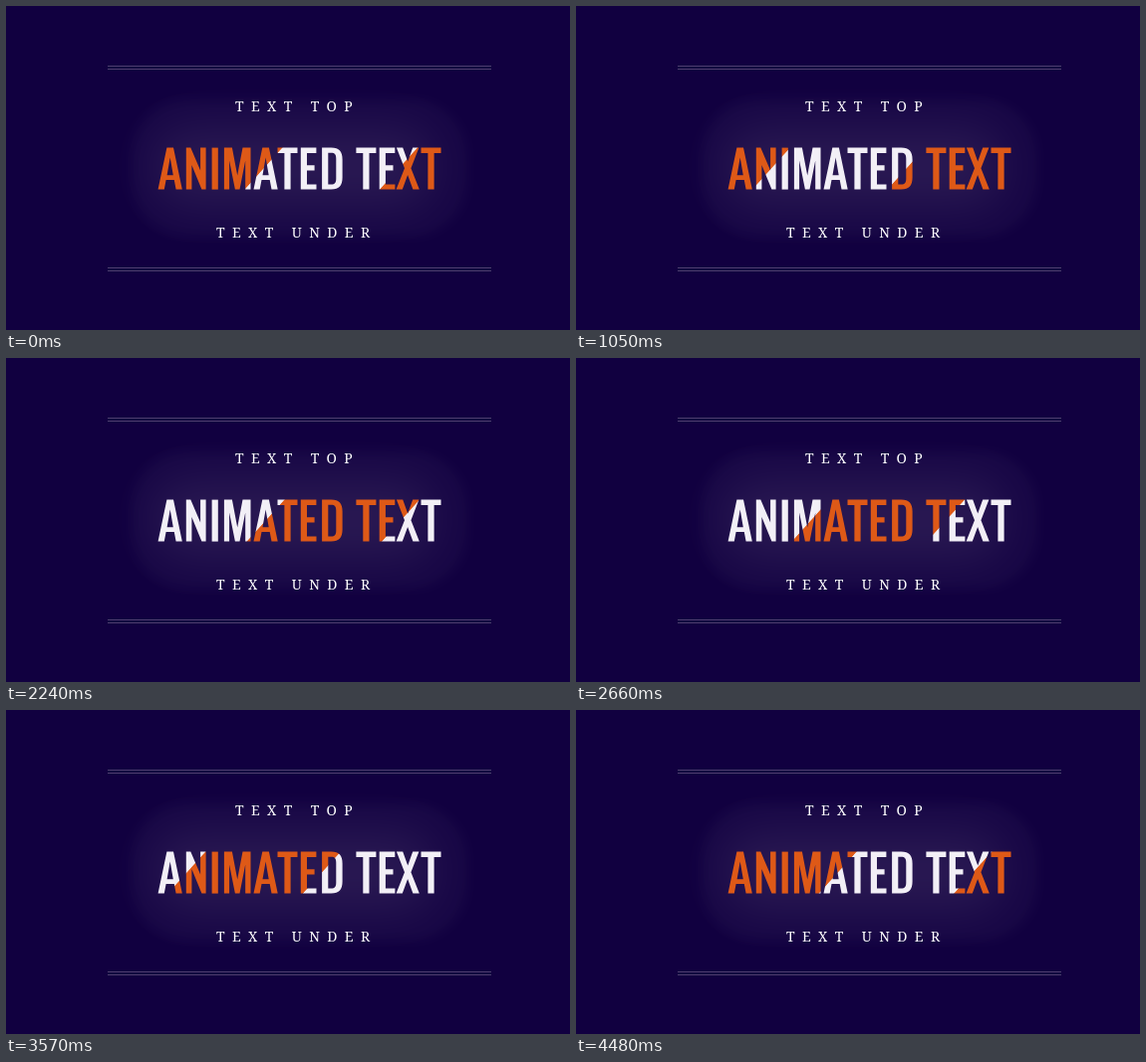
These frames come from a looping animation (566 by 326 pixels, 4.55 s). An HTML page:

```html
<!DOCTYPE html>
<html lang="en">
<head>
<meta charset="utf-8">
<title>Animated text</title>
<style>
  html, body { margin: 0; width: 100%; height: 100%; overflow: hidden; background: #110040; }
  svg { display: block; width: 566px; height: 326px; }
  .caption { font: 500 14px "Noto Serif", "Liberation Serif", serif; letter-spacing: 7.4px; fill: #fff; white-space: pre; }
  .rule { fill: #4c406e; }
</style>
</head>
<body>
<svg viewBox="0 0 566 326">
  <defs>
    <!-- one full orange and white stripe pair, 271 px wide along a row -->
    <linearGradient id="stripes" gradientUnits="userSpaceOnUse" spreadMethod="repeat" x1="0" y1="0" x2="149.7" y2="134.8">
      <stop offset="0" stop-color="#de5917"/>
      <stop offset=".004" stop-color="#f2eff6"/>
      <stop offset=".5" stop-color="#f2eff6"/>
      <stop offset=".504" stop-color="#de5917"/>
      <stop offset="1" stop-color="#de5917"/>
    </linearGradient>
    <filter id="soft" x="-50%" y="-100%" width="200%" height="300%"><feGaussianBlur stdDeviation="24"/></filter>
    <filter id="edge" x="-10%" y="-20%" width="120%" height="140%"><feGaussianBlur stdDeviation="6"/></filter>
  </defs>

  <rect width="566" height="326" fill="#110040"/>
  <rect x="126" y="94" width="338" height="138" rx="56" fill="#fff" opacity=".024" filter="url(#edge)"/>
  <rect x="148" y="122" width="280" height="80" rx="30" fill="#e8dcd8" opacity=".085" filter="url(#soft)"/>

  <g class="rule">
    <rect x="102" y="60" width="385" height="1"/>
    <rect x="102" y="63" width="385" height="1"/>
    <rect x="102" y="263" width="385" height="1"/>
    <rect x="102" y="266" width="385" height="1"/>
  </g>

  <text class="caption" x="230" y="106">TEXT TOP</text>
  <g id="title" role="img" aria-label="ANIMATED TEXT" fill="url(#stripes)"></g>
  <text class="caption" x="211" y="233">TEXT UNDER</text>
</svg>
<script>
  const LOOP = 4550, STEP = 70, PERIOD = 271, START = 405.2, TOP = 142.6;

  // Condensed capitals, 42 units tall, as drawing commands.
  const glyphs = {
    A: 'h6.6 l8.8 42 h-6.2 l-1.8 -9.6 h-8.2 l-1.8 9.6 h-6.2 z m.2 27.6 h6.2 l-3.1 -17.6 z',
    N: 'h4.5 l9.8 23 v-23 h5.5 v42 h-4.2 l-10 -24.5 v24.5 h-5.6 z',
    I: 'h6.2 v42 h-6.2 z',
    M: 'h8 l5.3 28 l5.3 -28 h8 v42 h-5.3 v-29 l-5.7 29 h-4.6 l-5.8 -29 v29 h-5.2 z',
    T: 'h20 v5.3 h-6.9 v36.7 h-6.2 v-36.7 h-6.9 z',
    E: 'h15.6 v5.3 h-9.4 v12.4 h7.6 v5.2 h-7.6 v13.9 h9.5 v5.2 h-15.7 z',
    D: 'h9.2 c8.3 0 11.3 4 11.3 11.8 v18.2 c0 8 -3 12 -11.3 12 h-9.2 z ' +
       'm6.2 5.1 v31.8 h2.9 c4 0 5.1 -1.9 5.1 -6 v-19.8 c0 -4.1 -1.1 -6 -5.1 -6 z',
    X: 'h6.3 l5 13.8 l5 -13.8 h6.2 l-8 20.7 l8.4 21.3 h-6.4 l-5.3 -14.6 l-5.3 14.6 h-6.2 l8.4 -21.3 z'
  };

  const letters = [
    ['A', 161.4], ['N', 180.8], ['I', 206.6], ['M', 218.9], ['A', 257.3], ['T', 272.5],
    ['E', 295.8], ['D', 317.1], ['T', 351.4], ['E', 374.7], ['X', 391.9], ['T', 416.5]
  ];

  const title = document.getElementById('title');
  for (const [name, x] of letters) {
    const path = document.createElementNS('http://www.w3.org/2000/svg', 'path');
    path.setAttribute('d', `M${x} ${TOP} ${glyphs[name]}`);
    path.setAttribute('fill-rule', 'evenodd');
    title.append(path);
  }

  const stripes = document.getElementById('stripes');
  function draw() {
    const time = Math.floor((performance.now() % LOOP) / STEP) * STEP;
    const x = START - PERIOD * time / LOOP;
    stripes.setAttribute('gradientTransform', `translate(${x} 0)`);
    requestAnimationFrame(draw);
  }
  draw();
</script>
</body>
</html>
```
